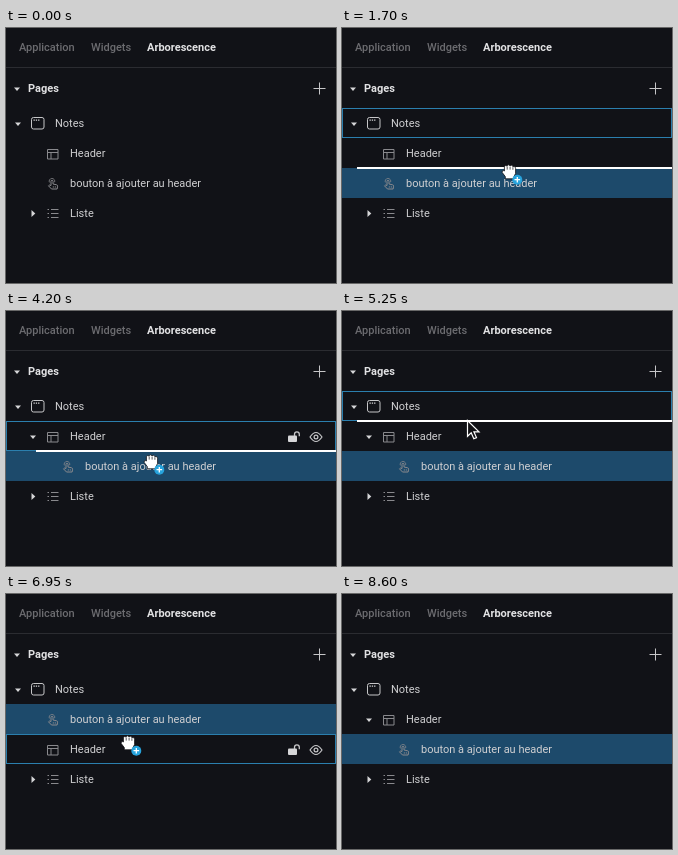
An HTML page for the animation above (8950 ms loop, 330 by 255 pixels).

```html
<!DOCTYPE html>
<html lang="fr">
<head>
<meta charset="utf-8">
<title>Arborescence</title>
<style>
html, body { margin: 0; width: 100%; height: 100%; overflow: hidden; background: #111217; }
svg { display: block; width: 330px; height: 255px; }
text { font: 11px Roboto, Arial, sans-serif; fill: #cfcfd1; }
.tab { font-weight: 500; fill: #6c6c70; }
.bold { font-weight: 700; fill: #e2e2e4; }
.thin { fill: none; stroke: #89898d; }
.light { fill: none; stroke: #c6c6c8; }
.solid { fill: #d6d6d8; }
</style>
</head>
<body>
<svg viewBox="0 0 330 255">
  <rect width="330" height="255" fill="#111217"/>
  <text class="tab" x="13" y="23">Application</text>
  <text class="tab" x="85" y="23">Widgets</text>
  <text class="bold" x="141" y="23">Arborescence</text>
  <rect y="39" width="330" height="1" fill="#2b2c31"/>
  <path class="solid" d="M8 59.5h6l-3 3.5z"/>
  <text class="bold" x="22" y="64">Pages</text>
  <path class="light" d="M307.5 60.5h12M313.5 54.5v12"/>

  <rect id="fill" width="330" height="30" fill="#1d4a6b"/>
  <rect id="outline" x=".5" width="329" height="29" fill="none" stroke="#2b7fae"/>

  <path class="solid" d="M9 94.5h6l-3 3.5z"/>
  <rect class="light" x="25.5" y="89.5" width="12.5" height="11.5" rx="2"/>
  <path class="solid" d="M27.5 91.5h1.3v1.3h-1.3zM29.8 91.5h1.3v1.3h-1.3zM32.1 91.5h1.3v1.3h-1.3z"/>
  <text x="49" y="99">Notes</text>

  <g id="header">
    <path id="caret" class="solid" d="M24 14.5h6l-3 3.5z"/>
    <path class="thin" d="M41.5 11.5h10.5v9.5h-10.5zM41.5 14.5h10.5M45 14.5v6.5"/>
    <text x="64" y="19">Header</text>
  </g>
  <g id="button">
    <path class="thin" d="M45 17.5v-4.2a1 1 0 0 1 2 0v2.7l3.6.8q1.1.3 1 1.4l-.5 2.8h-5.6l-3-3.2q.6-1.3 2.5-.3"/>
    <path class="thin" d="M43.4 14.4a2.8 2.8 0 1 1 5.2-.2" stroke-width=".8"/>
    <path class="thin" d="M47.3 18v1.8M49.3 18v1.8" stroke-width=".7"/>
    <text x="64" y="19">bouton à ajouter au header</text>
  </g>
  <path class="solid" d="M25.5 182v7l3.8-3.5z"/>
  <path class="thin" d="M41.5 181.5h1.5M45 181.5h7.5M41.5 185.5h1.5M45 185.5h7.5M41.5 189.5h1.5M45 189.5h7.5"/>
  <text x="64" y="189">Liste</text>

  <g id="tools">
    <rect class="solid" x="282" y="14.5" width="9" height="6.5" rx="1"/>
    <path class="light" d="M288.5 15v-1.8a2.4 2.4 0 0 1 4.8 0v2" stroke-width="1.3"/>
    <path class="light" d="M304 16q6-9 12 0q-6 9-12 0z" stroke-width="1.2"/>
    <circle class="light" cx="310" cy="16" r="1.9" stroke-width="1.2"/>
  </g>
  <rect id="line" height="2" fill="#fff"/>

  <path id="arrow" d="M.5.5v15.8l3.7-3.5 2.6 6 2.7-1.2-2.6-5.8h5.1z" fill="#101014" stroke="#fff" stroke-width="1.2"/>
  <g id="hand">
    <path d="M-3.7 11.8V9.6L-6.8 5.5Q-7.4 3.3-5.2 3.6L-4.6 4V-.2Q-3.6-2.4-1.9-1Q-.6-3.2 1-1.3Q2.8-2.6 3.9-.5Q6.3-1.3 6.6 1.2V6.4L5.2 9.2v2.6z" fill="#fff" stroke="#101014" stroke-width=".8"/>
    <path d="M-1.8-.4v3M1.1-.4v3M3.9.2v2.6" stroke="#101014" stroke-width=".7"/>
    <circle cx="8.3" cy="12.7" r="5" fill="#27a3dc"/>
    <path d="M5.5 12.7h5.6M8.3 9.9v5.6" stroke="#fff" stroke-width="1.3"/>
  </g>
</svg>
<script>
const LOOP = 8950, SHOW = 550, HIDE = 8600;
const NOTES = 80, FIRST = 110, SECOND = 140, ROW = 30;
const START = { x: 215, y: 220 };

// start, end, number of steps, destination x and y
const MOVES = [
  [700, 900, 3, 186, 157],
  [1400, 1900, 8, 155, 128],
  [3600, 3950, 5, 147, 153],
  [4150, 4200, 2, 145, 146],
  [4250, 4550, 4, 131, 122],
  [4700, 4750, 2, 125, 109],
  [6150, 6200, 2, 121, 144],
  [6300, 6300, 1, 120, 135],
  [6600, 6800, 3, 121, 138],
  [6950, 6950, 1, 122, 144],
  [8150, 8550, 7, 150, 9]
];

// grab, release, drop, tools return, next pointer move
const DRAGS = [
  [1400, 2100, 2300, 2400, 3600],
  [4150, 5250, 5500, 5500, 6150],
  [6600, 7100, 7350, 7400, 8150]
];

const el = {};
document.querySelectorAll('[id]').forEach(node => el[node.id] = node);

const show = (node, on) => node.setAttribute('visibility', on ? 'visible' : 'hidden');
const place = (node, x, y) => node.setAttribute('transform', `translate(${x} ${y})`);

function pointer(t) {
  let { x, y } = START;
  for (const [start, end, steps, toX, toY] of MOVES) {
    if (t < start) break;
    let done = 0;
    for (let k = 0; k < steps; k++) {
      const at = start + k * (end - start) / Math.max(1, steps - 1);
      if (t >= Math.round(at / 50) * 50) done++;
    }
    x += (toX - x) * done / steps;
    y += (toY - y) * done / steps;
  }
  return { x: Math.round(x), y: Math.round(y) };
}

function tree(t) {
  const nested = (t >= 2300 && t < 5500) || t >= 7350;
  const swapped = t >= 5500 && t < 7350;
  return {
    nested,
    header: swapped ? SECOND : FIRST,
    button: swapped ? FIRST : SECOND
  };
}

const rowAt = y => y < NOTES ? null : NOTES + ROW * Math.min(3, Math.floor((y - NOTES) / ROW));

// Row to outline and, between rows, the insertion line
function dropTarget(y, { nested, header, button }) {
  const row = rowAt(y), offset = y - row;
  let line = null;
  if (row === button) line = offset < ROW / 2 ? row : row + ROW;
  else if (offset < 4) line = row;
  else if (offset > ROW - 4) line = row + ROW;
  if (line === null) return { row };
  const inside = nested && line > header;
  return { row: inside ? header : NOTES, line, indent: inside ? 30 : 15 };
}

function hover(t, y, layout) {
  if (t < SHOW || t >= HIDE) return {};
  for (const [grab, , drop, tools, move] of DRAGS) {
    if (t >= grab && t < drop) {
      const target = dropTarget(y, layout);
      return { ...target, tools: target.row };
    }
    if (t >= drop && t < move) return { tools: t >= tools ? layout.button : null };
  }
  const row = rowAt(y);
  return { row, tools: row };
}

function draw(t) {
  const layout = tree(t), { x, y } = pointer(t);
  const { row, line, indent, tools } = hover(t, y, layout);
  const holding = DRAGS.some(([grab, release]) => t >= grab && t < release);
  const visible = t >= SHOW && t < HIDE;

  place(el.header, 0, layout.header);
  place(el.button, layout.nested ? 15 : 0, layout.button);
  show(el.caret, layout.nested);

  show(el.fill, t >= DRAGS[0][0]);
  el.fill.setAttribute('y', layout.button);

  show(el.outline, row != null);
  if (row != null) el.outline.setAttribute('y', row + 0.5);

  show(el.tools, tools > NOTES);
  if (tools > NOTES) place(el.tools, 0, tools);

  show(el.line, line != null);
  if (line != null) {
    el.line.setAttribute('x', indent);
    el.line.setAttribute('y', line - 1);
    el.line.setAttribute('width', 330 - indent);
  }

  show(el.arrow, visible && !holding);
  show(el.hand, visible && holding);
  place(el.arrow, x, y);
  place(el.hand, x, y);
}

const begin = performance.now();
function tick() {
  draw((performance.now() - begin) % LOOP);
  requestAnimationFrame(tick);
}
draw(0);
requestAnimationFrame(tick);
</script>
</body>
</html>
```
